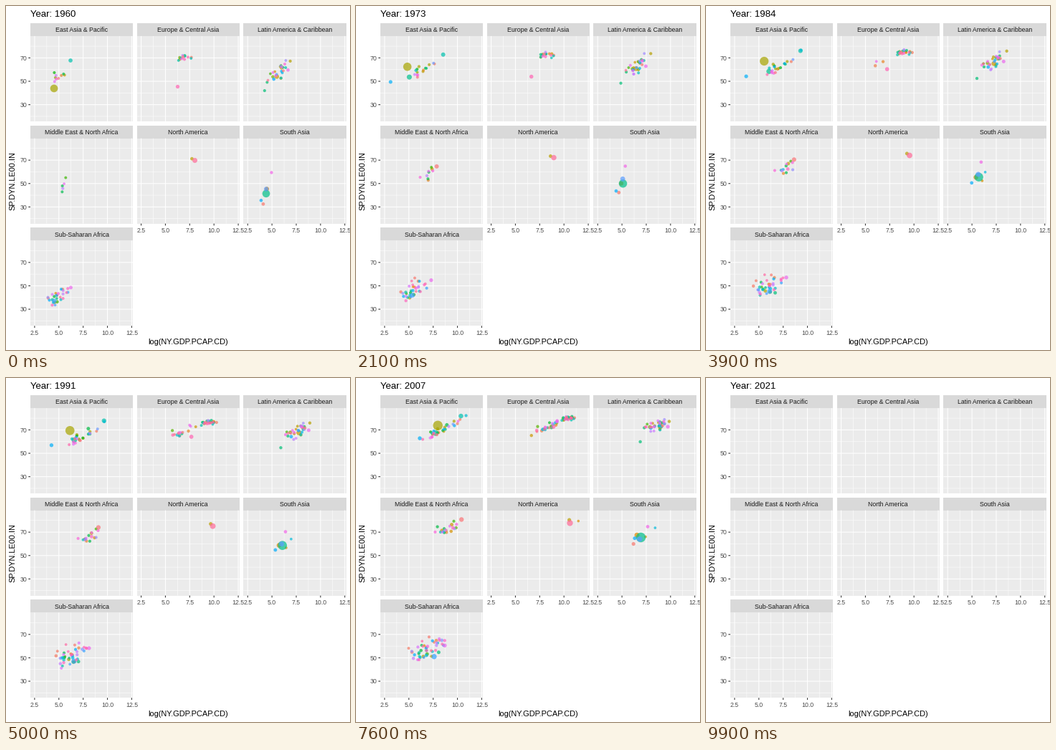
Write a matplotlib script that moves like this. It is 480 px wide and 480 px high and loops after 10000 ms.

```python
import numpy as np
import matplotlib.pyplot as plt
from matplotlib.animation import FuncAnimation
from matplotlib.patches import Rectangle

SIZE, FRAMES, LAST = 480, 100, 97
PT = 0.75                       # points per pixel at 96 dpi
LEFT, TOP = 34.0, 24.0
PITCH_X, PITCH_Y = 148.67, 142.7
PANEL_W, STRIP_H, PANEL_H = 143.17, 17.9, 119.0
EAP, ECA, LAC, MENA, NAM, SAS, SSA = range(7)
NAMES = ["East Asia & Pacific", "Europe & Central Asia",
         "Latin America & Caribbean", "Middle East & North Africa",
         "North America", "South Asia", "Sub-Saharan Africa"]

plt.rcParams["font.family"] = "Liberation Sans"
rng = np.random.default_rng(5)
t = np.arange(FRAMES)
stage = np.minimum(t / 86, 1.04)    # development levels off near the end
dots = []


def px(panel, v):
    return LEFT + 5.9 + panel % 3 * PITCH_X + (v - 2.5) * 13.55


def py(panel, v):
    return 72.4 + panel // 3 * PITCH_Y - (v - 70) * 1.632


def grow(ends, power=1.0):
    a, b = ends
    return a + (b - a) * stage ** power


def hue_color(k):
    """Evenly spaced HCL hue (chroma 100, luminance 65) as sRGB."""
    h, lum = np.radians(15 + 360 * k / 217), 65
    u = 100 * np.cos(h) / (13 * lum) + 0.1978
    v = 100 * np.sin(h) / (13 * lum) + 0.4683
    y = ((lum + 16) / 116) ** 3
    x = 9 * y * u / (4 * v)
    z = 3 * y / v - 5 * y - x / 3
    rgb = np.array([3.2405 * x - 1.5371 * y - 0.4985 * z,
                    -0.9693 * x + 1.8760 * y + 0.0416 * z,
                    0.0556 * x - 0.2040 * y + 1.0572 * z])
    rgb = np.clip(rgb, 0, 1)
    return np.where(rgb > 0.0031308,
                    1.055 * rgb ** (1 / 2.4) - 0.055, 12.92 * rgb)


def add_dot(panel, k, pop, x, y, absent=(0, 0)):
    """Add one country; pop is its final population in millions."""
    millions = pop * (0.45 + 0.55 * t / LAST)
    dots.append(dict(
        k=k, x=px(panel, x), y=py(panel, np.minimum(y, 84.5)),
        r=1.77 + 5.33 * np.sqrt(millions / 1411),
        on=(t <= LAST) & ((t < absent[0]) | (t >= absent[1]))))


def country(panel, k, pop, x, y, px_pow=1.0, py_pow=0.8, absent=(0, 0)):
    """A large or isolated country easing from its first to its last value."""
    add_dot(panel, k, pop, grow(x, px_pow), grow(y, py_pow), absent)


def cloud(panel, count, x, y, spread, slope, rest,
          px_pow=0.9, py_pow=0.9, born=(0, 60)):
    """Scatter smaller countries around a drifting regional trend line."""
    for j in range(count[1]):
        u, v = np.clip(rng.normal(size=2), -1.9, 1.9)
        phase = rng.uniform(0, 2 * np.pi, 2)
        u = u + 0.2 * np.sin(t / 13 + phase[0])
        v = v + 0.3 * np.sin(t / 11 + phase[1])
        dx = grow(spread) * u
        late = max(0, j + 1 - count[0]) / (count[1] - count[0])
        start = born[0] + late * (born[1] - born[0]) if late else 0
        add_dot(panel, rng.integers(217), rng.lognormal(1.7, 1.0),
                grow(x, px_pow) + dx,
                grow(y, py_pow) + grow(slope) * dx + grow(rest) * v,
                (0, start))


# China, Indonesia, Japan, Myanmar
country(EAP, 42, 1411, (4.5, 8.85), (43.9, 75.1), 1.8, 0.37)
country(EAP, 91, 272, (3.2, 8.15), (46, 69.5), 0.7, absent=(0, 11))
country(EAP, 101, 126, (6.2, 10.6), (67.8, 83.3), 0.45)
country(EAP, 131, 54, (2.9, 7.08), (42, 65), 2.1, absent=(0, 16))
cloud(EAP, (9, 28), (5.7, 9.0), (60, 73.5),
      (0.9, 1.15), (6, 4.2), (3, 1.9), 0.75, 1.1)

# Turkey, then western and eastern Europe
country(ECA, 198, 84, (6.26, 9.44), (45.4, 75.9), 1.5, 0.9)
cloud(ECA, (13, 25), (6.9, 10.7), (70, 81.2),
      (0.45, 0.42), (1, 1.2), (1.4, 0.9), 0.8, 1.15)
cloud(ECA, (0, 25), (5.0, 9.0), (64, 74.8),
      (0.65, 0.85), (1.5, 2.8), (2.2, 1.5), 1.4, 1.5, born=(36, 58))

# Brazil, Haiti
country(LAC, 27, 208, (5.5, 9.4), (54, 75))
country(LAC, 85, 11, (4.24, 7.27), (42, 61.7), 1.1)
cloud(LAC, (25, 34), (5.75, 9.0), (57.5, 75.3),
      (0.6, 0.68), (7, 1.2), (3.4, 2), 0.9, 0.75)

cloud(MENA, (5, 20), (5.35, 8.9), (48, 75),
      (0.4, 1.1), (2.5, 2.5), (2.8, 1.8), 0.6, 0.7)

# Bermuda, Canada, United States
country(NAM, 20, 0.1, (11.2, 11.52), (70, 80.5), absent=(0, 65))
country(NAM, 35, 38, (7.73, 10.88), (71.2, 81.8), 0.9, 1.1)
country(NAM, 206, 331, (8.03, 10.88), (69.8, 78.8), 0.8, 0.95)

# Afghanistan, Bangladesh, Bhutan, India, Maldives, Nepal, Pakistan, Sri Lanka
country(SAS, 0, 39, (4.1, 6.46), (32.5, 62.8), absent=(34, 68))
country(SAS, 17, 167, (4.48, 6.87), (45.4, 71), 1.2, 1.2)
country(SAS, 23, 0.8, (4.6, 7.8), (33, 69.5), absent=(0, 32))
country(SAS, 90, 1396, (4.4, 7.28), (41.4, 68))
country(SAS, 117, 0.5, (4.2, 8.97), (40, 77.2), absent=(0, 32))
country(SAS, 134, 29, (3.88, 6.7), (35.6, 68.6), 1.2, 1)
country(SAS, 144, 227, (4.41, 7.13), (45.3, 65.5), 1, 0.6)
country(SAS, 179, 22, (4.95, 8.2), (59.4, 76.3), 1.5)

# Nigeria, South Africa
country(SSA, 141, 206, (4.53, 8), (37, 52.5))
country(SSA, 176, 59, (6.23, 8.9), (48.5, 61.3), 0.65, 0.5)
cloud(SSA, (26, 44), (4.85, 7.1), (41.8, 60),
      (0.55, 0.95), (2.5, 2), (4.3, 4.5))

dots.sort(key=lambda d: d["k"])
X, Y, R, ON = (np.array([d[key] for d in dots]) for key in ("x", "y", "r", "on"))
COLORS = np.array([hue_color(d["k"]) for d in dots])

fig = plt.figure(figsize=(5, 5), dpi=96, facecolor="white")
ax = fig.add_axes([0, 0, 1, 1])
ax.set(xlim=(0, SIZE), ylim=(SIZE, 0))
ax.axis("off")


def label(x, y, s, size, color="black", ha="center", va="baseline", **kw):
    return ax.text(x, y, s, fontsize=size * PT, color=color, ha=ha, va=va, **kw)


def line(xs, ys, color, width):
    ax.plot(xs, ys, color=color, lw=width * PT, zorder=2, snap=False,
            solid_capstyle="butt")


def box(x, y, w, h, color):
    ax.add_patch(Rectangle((x, y), w, h, fc=color, lw=0, zorder=1))


def draw_panel(p):
    x0 = LEFT + p % 3 * PITCH_X
    y0 = TOP + p // 3 * PITCH_Y
    top, right = y0 + STRIP_H, x0 + PANEL_W
    bottom = top + PANEL_H
    box(x0, y0, PANEL_W, STRIP_H, "#d9d9d9")
    box(x0, top, PANEL_W, PANEL_H, "#ebebeb")
    label((x0 + right) / 2, y0 + 12.2, NAMES[p], 8.8, "#1a1a1a")
    for v in range(20, 81, 10):
        y = py(p, v)
        line([x0, right], [y, y], "white", 1.07 if v % 20 == 10 else 0.53)
    for i, v in enumerate(np.arange(2.5, 12.6, 1.25)):
        x = px(p, v)
        line([x, x], [top, bottom], "white", 0.53 if i % 2 else 1.07)
        if i % 2 == 0 and p > 3:
            line([x, x], [bottom, bottom + 2.75], "#333333", 1.07)
            label(x, bottom + 12.3, f"{v:.1f}", 8.8, "#4d4d4d")
    if p % 3 == 0:
        for v in (30, 50, 70):
            y = py(p, v)
            line([x0 - 2.75, x0], [y, y], "#333333", 1.07)
            label(x0 - 4.9, y + 3.2, str(v), 8.8, "#4d4d4d", "right")


for p in range(7):
    draw_panel(p)
label(254, 472, "log(NY.GDP.PCAP.CD)", 11)
label(9.2, 244, "SP.DYN.LE00.IN", 11, va="center", rotation=90)
title = label(LEFT, 15, "", 13.2, ha="left")
points = ax.scatter([], [], linewidths=0, alpha=0.7, zorder=3)


def update(i):
    title.set_text(f"Year: {round(1960 + 61 * i / (FRAMES - 1))}")
    on = ON[:, i]
    points.set_offsets(np.column_stack([X[on, i], Y[on, i]]))
    points.set_sizes((2 * R[on, i] * PT) ** 2)
    points.set_facecolor(COLORS[on])
    return title, points


anim = FuncAnimation(fig, update, frames=FRAMES, interval=100,
                     init_func=lambda: update(0), repeat=True, repeat_delay=0)
plt.show()
```
